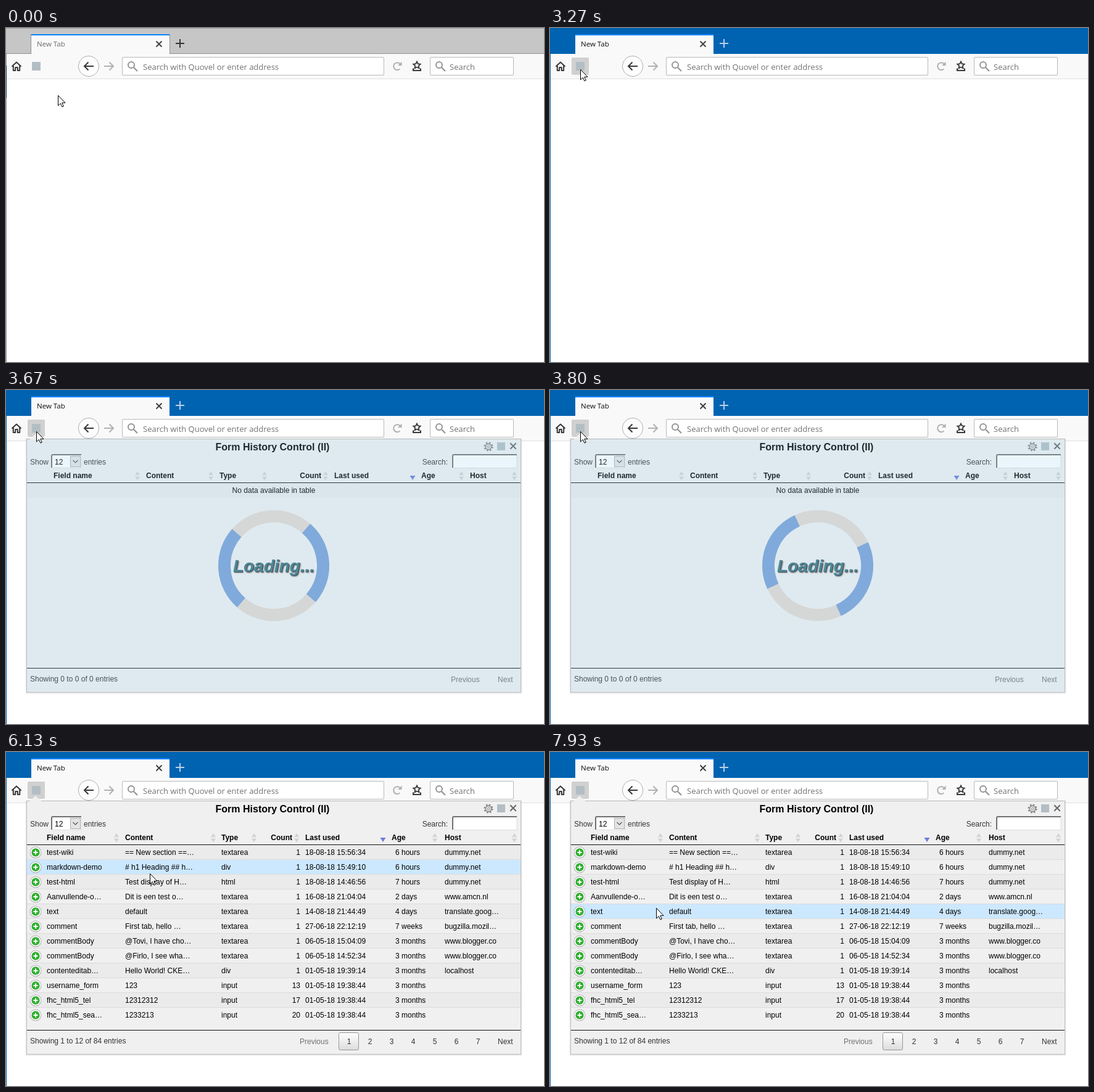
An HTML page for the animation above (8000 ms loop, 872 px wide and 542 px high).

```html
<!DOCTYPE html>
<html lang="en">
<head>
<meta charset="utf-8">
<title>Form History Control</title>
<style>
html, body { margin: 0; width: 100%; height: 100%; overflow: hidden; background: #fff; }
#stage { position: absolute; left: 0; top: 0; width: 872px; height: 542px; overflow: hidden; }
#stage div, svg { position: absolute; left: 0; top: 0; }
.layer { width: 872px; height: 542px; }
#stage .t { white-space: pre; line-height: 20px; margin-top: -14px; color: #000;
  font-family: "Liberation Sans", Arial, sans-serif; font-size: 12px; }
#stage .right { left: auto; text-align: right; }
#stage .center { width: 300px; text-align: center; }
#stage .bold { font-weight: bold; }
#stage .dark { color: #333; }
#stage .dim { color: #707070; }
#stage .title { font-size: 16px; font-weight: bold; margin-top: -15px; }
#stage .small { font-family: "Open Sans", sans-serif; font-size: 11.5px; }
#stage .field { font-family: "Open Sans", sans-serif; font-size: 13px; color: #737373; margin-top: -15px; }
#stage .loading { font-size: 28px; font-weight: bold; font-style: italic; margin-top: -19px;
  color: #4b8996; text-shadow: 1px 1px 1px #445, 2px 2px 2px #999; }
</style>
</head>
<body>
<div id="stage"></div>
<script>
const LOOP = 8000, FPS = 15;
const ROW_TOP = 151, ROW_HEIGHT = 24;

const svg = (body, id = '') =>
  `<svg id="${id}" width="872" height="542" fill="none">${body}</svg>`;
const layer = (id, body) => `<div class="layer" id="${id}">${body}</div>`;
const box = (x, y, w, h, fill, extra = '') =>
  `<rect x="${x}" y="${y}" width="${w}" height="${h}" fill="${fill}" ${extra}/>`;
const line = (d, color, width = 1, extra = '') =>
  `<path d="${d}" stroke="${color}" stroke-width="${width}" ${extra}/>`;

// Labels are placed by their baseline.
function label(x, y, text, cls = '') {
  const side = cls.includes('right') ? `right:${872 - x}px`
    : `left:${cls.includes('center') ? x - 150 : x}px`;
  return `<div class="t ${cls}" style="${side};top:${y}px">${text}</div>`;
}

const cross = (x, y, r, color, width) =>
  line(`M${x - r} ${y - r}l${2 * r} ${2 * r}m0 ${-2 * r}l${-2 * r} ${2 * r}`, color, width);
const magnifier = x =>
  `<circle cx="${x}" cy="60" r="5" stroke="#949496" stroke-width="2"/>` +
  line(`M${x + 4} 64l6 6`, '#949496', 2.2);
const starPoints = (cx, cy, outer, inner) => Array.from({ length: 10 }, (_, i) => {
  const a = (i / 5 - .5) * Math.PI, r = i % 2 ? inner : outer;
  return `${cx + r * Math.cos(a)},${cy + r * Math.sin(a)}`;
}).join(' ');

function browser() {
  const ink = '#38383b', pale = '#b1b1b3';
  return svg(
    box(0, 0, 872, 42, '#c6c6c6', 'id="titlebar"') +
    `<g id="inactiveEdges">${box(0, 0, 872, 1, '#a2a2a2')}${box(0, 41, 872, 1, '#929292')}${
      box(40, 10, 226, 32, '#929292')}</g>` +
    box(41, 10, 224, 32, '#f9f9fa') + box(41, 10, 224, 2, '#0a84ff', 'id="tabLine"') +
    box(0, 42, 872, 40, '#f9f9fa') + box(0, 82, 872, 1, '#e1e1e2') +
    box(0, 42, 1, 500, '#999', 'id="leftEdge"') +
    box(0, 61, 1, 52, '#203a70', 'id="behind"') +
    cross(248, 26, 4.5, '#3c3c3c', 1.8) +
    `<path id="plus" d="M275 25h14M282 18v14" stroke-width="2"/>` +
    line('M9.5 62.5L17 55.5L24.5 62.5M11.8 61v8h3.4v-5h3.6v5h3.4v-8', ink, 2, 'stroke-linejoin="round"') +
    box(35, 48, 28, 28, '#dfdfe0', 'id="button" rx="2"') +
    box(42, 55, 14, 14, '#b3bec4') +
    `<circle cx="134" cy="62" r="16.5" fill="#fdfdfd" stroke="#adadad"/>` +
    line('M142 62h-15m6.5-6.5L127 62l6.5 6.5', ink, 2) +
    line('M159 62h15m-6.5-6.5L174 62l-6.5 6.5', pale, 2) +
    box(188.5, 47.5, 424, 29, '#fff', 'rx="1.5" stroke="#b9b9b9"') +
    box(687.5, 47.5, 135, 29, '#fff', 'rx="1.5" stroke="#b9b9b9"') +
    magnifier(203) + magnifier(702) +
    line('M638.5 66.4A6 6 0 1 1 639 58.5', pale, 2) +
    `<path d="M641.5 54.5v6.5h-6.5z" fill="${pale}"/>` +
    `<polygon points="${starPoints(666, 60.5, 6, 3)}" stroke="${ink}" stroke-width="1.8"/>` +
    line('M660 65.5v3.5h12v-3.5', ink, 2)
  ) +
  `<div class="t small" id="tabTitle" style="left:50px;top:30px">New Tab</div>` +
  label(222, 68, 'Search with Quovel or enter address', 'field') + label(719, 68, 'Search', 'field');
}

const tooltip = () => layer('tooltip',
  svg(box(49.5, 88.5, 142, 22, '#fff', 'stroke="#767676"')) +
  label(56, 104, 'Form History Control (II)', 'small'));

const inset = (x, w) =>
  box(x, 104, w, 23, '#fff', 'rx="3"') +
  line(`M${x + 1} 126v-19q0-2 2-2h${w - 3}`, '#707070', 2) +
  line(`M${x + 2} 126.5h${w - 2}v-20`, '#ddd');

function panelFrame() {
  const gear = '#8a8a8a';
  return svg(
    box(32.5, 79.5, 803, 412.5, 'none', 'rx="1" stroke="#000" stroke-opacity=".08" stroke-width="2"') +
    box(33.5, 79.5, 801, 411, '#f0f0f0', 'stroke="#bcbcbc"') +
    '<path d="M38 80.5L48 71L58 80.5Z" fill="#f0f0f0"/>' +
    `<circle cx="782" cy="92" r="6.3" stroke="${gear}" stroke-width="2.6" stroke-dasharray="2.6 2.35"/>` +
    `<circle cx="782" cy="92" r="4.6" stroke="${gear}" stroke-width="1.6"/>` +
    `<circle cx="782" cy="92" r="1.8" stroke="${gear}"/>` +
    box(796, 85, 13, 13, '#b3bec4') + cross(822, 91, 4.7, '#666', 2) +
    inset(73, 49) + inset(723, 105) +
    box(104.5, 107.5, 16, 17, '#e4e4e4', 'stroke="#adadad"') +
    line('M108.5 114l4 4l4-4', '#555', 1.2)
  ) +
  label(432, 98, 'Form History Control (II)', 'title center') +
  label(39, 121, 'Show', 'dark') + label(79, 121, '12') + label(126, 121, 'entries', 'dark') +
  label(716, 121, 'Search:', 'dark right');
}

// Column heads, with their sort arrows; the fifth column is the sorted one.
const HEADS = ['Field name', 'Content', 'Type', 'Count', 'Last used', 'Age', 'Host'];
const headLabels = xs => HEADS.map((h, i) => label(xs[i], 143, h, i === 3 ? 'bold right' : 'bold')).join('');
const arrows = xs => xs.map((x, i) => i === 4
  ? `<path d="M${x - 4.5} 139h9l-4.5 7z" fill="#6a7fd8"/>`
  : `<path d="M${x - 4} 138h8l-4-6zm0 2.5h8l-4 6z" fill="#d2d2d6"/>`).join('');
const rules = box(34, 150, 800, 1, '#111') + box(34, 451, 800, 1, '#111');

const ROWS = `test-wiki|== New section ==…|textarea|1|18-08-18 15:56:34|6 hours|dummy.net
markdown-demo|# h1 Heading ## h…|div|1|18-08-18 15:49:10|6 hours|dummy.net
test-html|Test display of H…|html|1|18-08-18 14:46:56|7 hours|dummy.net
Aanvullende-o…|Dit is een test o…|textarea|1|16-08-18 21:04:04|2 days|www.amcn.nl
text|default|textarea|1|14-08-18 21:44:49|4 days|translate.goog…
comment|First tab, hello …|textarea|1|27-06-18 22:12:19|7 weeks|bugzilla.mozil…
commentBody|@Tovi, I have cho…|textarea|1|06-05-18 15:04:09|3 months|www.blogger.co
commentBody|@Firlo, I see wha…|textarea|1|06-05-18 14:52:34|3 months|www.blogger.co
contenteditab…|Hello World! CKE…|div|1|01-05-18 19:39:14|3 months|localhost
username_form|123|input|13|01-05-18 19:38:44|3 months|
fhc_html5_tel|12312312|input|17|01-05-18 19:38:44|3 months|
fhc_html5_sea…|1233213|input|20|01-05-18 19:38:44|3 months|`.split('\n').map(r => r.split('|'));

function table() {
  const cellX = [66, 193, 349, 477, 485, 631, 711];
  const rowTop = i => ROW_TOP + ROW_HEIGHT * i;
  const stripes = ROWS.map((_, i) => box(34, rowTop(i), 800, 24, i % 2 ? '#f0f0f0' : '#ebebeb')).join('');
  const marks = ROWS.map((_, i) => {
    const y = rowTop(i) + 12;
    return (i ? box(34, y - 13, 800, 1, '#dcdcdc') : '') +
      `<circle cx="48" cy="${y}" r="8.2" fill="#31b131" stroke="#aaa" stroke-width="2.4"/>
       <circle cx="48" cy="${y}" r="7.6" stroke="#fff" stroke-width="1.8"/>` +
      line(`M44.5 ${y}h7m-3.5-3.5v7`, '#fff', 2);
  }).join('');
  const cells = ROWS.map((row, i) => row.map((text, c) =>
    label(cellX[c], rowTop(i) + 16, text, c === 3 ? 'right' : '')).join('')).join('');
  const pages = [556, 590, 625, 660, 695, 730, 765]
    .map((x, i) => label(x, 474, i + 1, 'dark center')).join('');
  return layer('table', svg(
      '<linearGradient id="shine" x2="0" y2="1"><stop stop-color="#fff"/>' +
      '<stop offset="1" stop-color="#dcdcdc"/></linearGradient>' +
      stripes + box(34, 0, 800, 24, '#cce8ff', 'id="hover"') + marks + rules +
      arrows([179, 336, 402, 471, 611, 695, 824]) +
      box(539.5, 455.5, 32, 28, 'url(#shine)', 'rx="2" stroke="#979797"')) +
    headLabels([66, 193, 349, 464, 485, 625, 711]) + cells + pages +
    label(39, 473, 'Showing 1 to 12 of 84 entries', 'dark') +
    label(476, 474, 'Previous', 'dim') + label(797, 474, 'Next', 'dark'));
}

function loading() {
  const quarter = Math.PI * 40;
  return layer('loading', svg(
      box(34, ROW_TOP, 800, 24, '#ebebeb') + rules + arrows([213, 332, 419, 518, 659, 738, 824])) +
    headLabels([77, 227, 346, 511, 532, 673, 752]) +
    label(434, 167, 'No data available in table', 'center') +
    label(39, 473, 'Showing 0 to 0 of 0 entries', 'dark') +
    label(721, 474, 'Previous', 'dim') + label(797, 474, 'Next', 'dim') +
    svg(box(34, 80, 800, 410, 'rgba(155,210,240,.2)') +
      `<g id="spinner" stroke-width="20"><circle cx="434" cy="285" r="80" stroke="#d5d7d7"/>
       <circle cx="434" cy="285" r="80" stroke="#80aadb" stroke-dasharray="${quarter}"
         transform="rotate(-45 434 285)"/></g>`) +
    label(434, 295, 'Loading...', 'loading center'));
}

document.getElementById('stage').innerHTML =
  browser() + tooltip() + layer('panel', panelFrame() + loading() + table()) +
  svg('<path d="M.5.5V17L4.3 13.4L6.9 19L9.3 18L6.8 12.4H12Z" fill="#fff" stroke="#000"/>', 'cursor');

// Pointer path: step, x, y
const PATH = [[10, 84, 109], [14, 62, 83], [18, 49, 67], [80, 49, 67], [81, 55, 71], [87, 146, 134],
  [93, 250, 209], [97, 274, 238], [100, 256, 253], [103, 220, 260], [116, 220, 260], [119, 172, 253]];

function pointer(step) {
  const next = PATH.findIndex(p => p[0] >= step);
  if (next < 1) return (next ? PATH[PATH.length - 1] : PATH[0]).slice(1);
  const [s0, x0, y0] = PATH[next - 1], [s1, x1, y1] = PATH[next];
  const k = (step - s0) / (s1 - s0);
  return [Math.round(x0 + (x1 - x0) * k), Math.round(y0 + (y1 - y0) * k)];
}

const $ = id => document.getElementById(id);
const show = (id, on) => { $(id).style.display = on ? '' : 'none'; };
const fill = (id, color) => $(id).setAttribute('fill', color);

function draw(time) {
  const step = Math.floor((time + 4) * FPS / 1000);
  const active = step >= 49, loaded = step >= 58;
  const [x, y] = pointer(step);
  $('cursor').style.transform = `translate(${x}px,${y}px)`;

  fill('titlebar', active ? '#0063b1' : '#c6c6c6');
  fill('leftEdge', active ? '#0063b1' : '#999');
  show('inactiveEdges', !active);
  show('behind', !active);
  $('plus').setAttribute('stroke', active ? '#b5d0e8' : '#333');
  $('tabTitle').style.color = active ? '#0c0c0d' : '#6a6a6a';

  show('button', active || (x >= 35 && x < 63 && y < 76));
  fill('button', active ? '#d0d0d1' : '#e0e0e1');
  show('tooltip', step >= 26 && !active);

  show('panel', step >= 51);
  $('panel').style.opacity = Math.min(1, (step - 50) / 3);
  show('loading', !loaded);
  show('table', loaded);
  $('spinner').setAttribute('transform', `rotate(${(step - 55) * 12 - 4} 434 285)`);

  const row = Math.floor((y - ROW_TOP) / ROW_HEIGHT);
  show('hover', row >= 0);
  $('hover').setAttribute('y', ROW_TOP + row * ROW_HEIGHT);
}

const start = performance.now();
function tick() {
  draw((performance.now() - start) % LOOP);
  requestAnimationFrame(tick);
}
tick();
</script>
</body>
</html>
```
